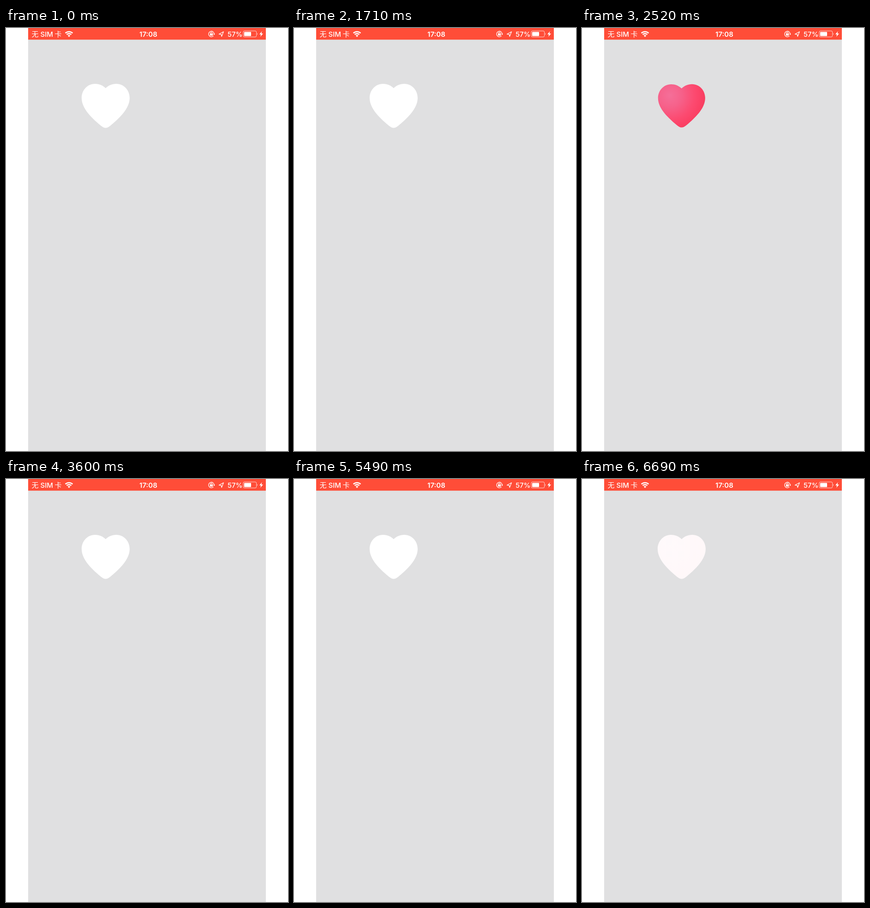
An HTML page with a canvas for the animation above (6.75 s loop, 611x917 px).

```html
<!DOCTYPE html>
<html lang="zh">
<head>
<meta charset="utf-8">
<title>Like button</title>
<style>
html, body { margin: 0; width: 100%; height: 100%; overflow: hidden; background: #fff; }
canvas, svg { position: absolute; left: 0; top: 0; display: block; }
text { font: 500 15px Inter, "Noto Sans CJK SC", "Noto Sans CJK", sans-serif; fill: #fff; }
.cjk { font: 400 15px "Noto Sans CJK SC", "Noto Sans CJK", sans-serif; }
.clock { font-weight: 600; }
</style>
</head>
<body>
<canvas id="stage" width="611" height="917"></canvas>
<svg width="611" height="26" viewBox="0 0 611 26">
  <rect x="48" y="0" width="515" height="25.3" fill="#ff4d38"/>
  <text class="cjk" x="55.5" y="18.7">无</text>
  <text x="74.5" y="18.6" font-weight="400">SIM</text>
  <text class="cjk" x="105.5" y="18.7">卡</text>
  <g fill="none" stroke="#fff" stroke-width="2.5">
    <path d="M128.6 11.2A11.4 11.4 0 0 1 144.4 11.2"/>
    <path d="M131.5 14.2A7.2 7.2 0 0 1 141.5 14.2"/>
  </g>
  <path d="M136.5 19.6L133.7 16.6A4 4 0 0 1 139.3 16.6Z" fill="#fff"/>
  <text class="clock" x="308.5" y="18.6" text-anchor="middle">17:08</text>
  <g fill="none" stroke="#fff" stroke-width="1.3">
    <path d="M449.6 16.9A6 6 0 1 1 451 13"/>
    <path d="M443.1 12.5V11.2A1.9 1.9 0 0 1 446.9 11.2V12.5"/>
    <path d="M461.5 13.3L471.3 8L467.2 18.4L466.3 13.9Z" stroke-linejoin="round"/>
  </g>
  <rect x="442" y="12" width="6" height="4.4" rx=".6" fill="#fff"/>
  <path d="M448.7 12.4H453L450.9 15.2Z" fill="#fff"/>
  <text x="480" y="18.6" font-weight="400">57%</text>
  <rect x="514" y="6.4" width="28.6" height="13" rx="2.6" fill="none" stroke="#fff" stroke-opacity=".75"/>
  <rect x="516" y="8.4" width="15" height="9" rx="1" fill="#fff"/>
  <path d="M544 10.8Q546 12.9 544 15Z" fill="#fff" fill-opacity=".8"/>
  <path d="M554.6 7L549 13.8H552.4L551.2 19L557 12H553.4Z" fill="#fff"/>
</svg>
<script>
const ctx = document.getElementById('stage').getContext('2d');
const LOOP = 6750;
const CENTER = { x: 215.9, y: 168.4 };
const CLIP = 93.5;
const RAY = { length: 110, half: 2.75, count: 6, time: 515 };

// [like, unlike] moments
const TAPS = [[60, 1050], [1710, 2820], [3600, 4530], [5490, 6480]];

// [ms after the tap, scale, degrees]
const POP = [[185, 0, -12], [390, 1.38, 4.4], [612, 0.79, -3.2], [830, 1, 0]];

const heart = new Path2D(
  'M0-38C-6-44-14-47.4-23-47.4C-40-47.4-52-33-52-17C-52 3-36 22-10 43.5' +
  'C-5 47.3-3 48 0 48C3 48 5 47.3 10 43.5C36 22 52 3 52-17' +
  'C52-33 40-47.4 23-47.4C14-47.4 6-44 0-38Z');

const pink = ctx.createRadialGradient(-26, -23, 0, -26, -23, 88);
pink.addColorStop(0, '#f56f99');
pink.addColorStop(0.3, '#f6618a');
pink.addColorStop(0.62, '#fc4a70');
pink.addColorStop(0.82, '#fb4064');
pink.addColorStop(1, '#ea4058');

const clamp = v => Math.min(1, Math.max(0, v));
const mix = (a, b, p) => a + (b - a) * p;

// cubic-bezier(.42, 0, .58, 1)
function easeInOut(x) {
  let lo = 0, hi = 1;
  for (let i = 0; i < 24; i++) {
    const s = (lo + hi) / 2, r = 1 - s;
    const v = 1.26 * s * r * r + 1.74 * s * s * r + s * s * s;
    if (v < x) lo = s; else hi = s;
  }
  return lo * lo * (3 - 2 * lo);
}

function pose(t) {
  if (t <= POP[0][0]) return POP[0].slice(1);
  for (let i = 1; i < POP.length; i++) {
    const a = POP[i - 1], b = POP[i];
    if (t < b[0]) {
      const p = (t - a[0]) / (b[0] - a[0]);
      return [mix(a[1], b[1], p), mix(a[2], b[2], p)];
    }
  }
  return [1, 0];
}

function drawHeart(fill, alpha, scale = 1, degrees = 0) {
  if (alpha <= 0 || scale <= 0) return;
  ctx.save();
  ctx.globalAlpha = alpha;
  ctx.translate(CENTER.x, CENTER.y);
  ctx.rotate(degrees * Math.PI / 180);
  ctx.scale(scale, scale);
  ctx.fillStyle = fill;
  ctx.fill(heart);
  ctx.restore();
}

// Rays grow from the centre, then their tips run out to the rim.
function drawRays(t) {
  if (t >= RAY.time) return;
  const e = easeInOut(clamp((t + 6) / RAY.time));
  const scale = clamp(e / 0.2);
  const tip = RAY.length * clamp((e - 0.2) / 0.8);
  ctx.save();
  ctx.beginPath();
  ctx.rect(CENTER.x - CLIP, CENTER.y - CLIP, CLIP * 2, CLIP * 2);
  ctx.clip();
  ctx.translate(CENTER.x, CENTER.y);
  ctx.scale(scale, scale);
  ctx.fillStyle = '#f04f78';
  for (let i = 0; i < RAY.count; i++) {
    ctx.beginPath();
    ctx.moveTo(-RAY.half, -RAY.length);
    ctx.lineTo(RAY.half, -RAY.length);
    ctx.lineTo(0, -tip);
    ctx.fill();
    ctx.rotate(Math.PI * 2 / RAY.count);
  }
  ctx.restore();
}

function draw(t) {
  ctx.fillStyle = '#fff';
  ctx.fillRect(0, 0, 611, 917);
  ctx.fillStyle = '#e0e0e1';
  ctx.fillRect(48, 25, 515, 892);

  const tap = TAPS.filter(([like]) => like <= t).pop();
  if (!tap) return drawHeart('#fff', 1);
  const [like, unlike] = tap;
  if (t >= unlike) {
    drawHeart('#fff', 1);
    drawHeart(pink, 1 - clamp((t - unlike + 20) / 240));
    return;
  }
  const age = t - like;
  const swap = clamp((age - POP[0][0]) / 140);
  drawHeart('#fff', 1 - swap);
  drawHeart(pink, swap, ...pose(age));
  drawRays(age);
}

const start = performance.now();
function tick() {
  draw((performance.now() - start) % LOOP);
  requestAnimationFrame(tick);
}
tick();
</script>
</body>
</html>
```
